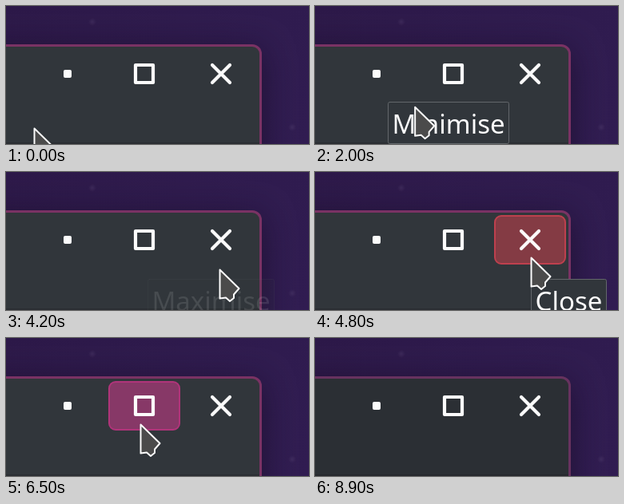
Write an HTML page with a canvas that moves like this. It is 379x173 px and loops after 9000 ms.

```html
<!DOCTYPE html>
<html lang="en">
<head>
<meta charset="utf-8">
<title>Window buttons</title>
<style>
  html, body { margin: 0; width: 100%; height: 100%; overflow: hidden; background: #2d1a4a; }
  canvas { display: block; }
</style>
</head>
<body>
<canvas width="379" height="173"></canvas>
<script>
const ctx = document.querySelector('canvas').getContext('2d');
const W = 379, H = 173, LOOP = 9000;
const FADE = 200, SAMPLES = 20;
const PRESS = 6400, RELEASE = 7450;

// Where the pointer rests; sag bends the way into a stop downwards.
const stops = [
  { x: 35, y: 153, arrive: -LOOP, leave: 320 },
  { x: 87, y: 100, arrive: 900, leave: 1380 },
  { x: 134, y: 127, arrive: 2250, leave: 2700, sag: 8 },
  { x: 178, y: 108, arrive: 3000, leave: 3270 },
  { x: 267, y: 122, arrive: 4200, leave: 4250, sag: 8 },
  { x: 270, y: 107, arrive: 4650, leave: 5260 },
  { x: 168, y: 108, arrive: 6480, leave: 6900, sag: 20 },
  { x: 168, y: 128, arrive: 7290, leave: 7320 },
  { x: 147, y: 118, arrive: 7700, leave: 7820 },
  { x: -32, y: 176, arrive: 8300, leave: LOOP }
];

const tips = [
  { label: 'Minimise', x: 91, y: 120, show: 1300, hide: 2090 },
  { label: 'Maximise', x: 177, y: 134, show: 2800, hide: 3925 },
  { label: 'Close', x: 270, y: 134, show: 4580, hide: 5780 }
];

const pink = { fill: [124, 56, 98], edge: [171, 52, 120] };
const pressed = { fill: [163, 57, 116], edge: [187, 53, 127] };
const red = { fill: [132, 59, 68], edge: [190, 64, 78] };
const tones = [pink, pink, red];

const ramp = (t, start, span) => Math.max(0, Math.min(1, (t - start) / span));
const smooth = p => p * p * (3 - 2 * p);
const lerp = (a, b, p) => a + (b - a) * p;
const mix = (a, b, p) => `rgb(${a.map((v, i) => Math.round(lerp(v, b[i], p)))})`;
const centerX = button => 77 + 96 * button;

function rounded(x, y, w, h, r) {
  ctx.beginPath();
  ctx.roundRect(x, y, w, h, r);
}

function pointerAt(t) {
  const i = stops.findIndex(s => t <= s.leave);
  const next = stops[i];
  if (t >= next.arrive) return next;
  const last = stops[i - 1];
  const p = smooth(ramp(t, last.leave, next.arrive - last.leave));
  return {
    x: lerp(last.x, next.x, p),
    y: lerp(last.y, next.y, p) + (next.sag || 0) * Math.sin(Math.PI * p)
  };
}

function isHot(button, t) {
  if (t > PRESS && t < RELEASE) return button === 1;
  const { x, y } = pointerAt(t);
  return y < 117 && Math.abs(x - centerX(button)) < 45;
}

// The highlight follows the hover state, averaged over the fade time.
function hoverAlpha(button, t) {
  let hot = 0;
  for (let i = 0; i < SAMPLES; i++) hot += isHot(button, t - FADE * i / SAMPLES);
  return hot / SAMPLES;
}

function drawBackdrop() {
  const g = ctx.createLinearGradient(0, 0, W, H);
  g.addColorStop(0, '#2c1848');
  g.addColorStop(1, '#301c51');
  ctx.fillStyle = g;
  ctx.fillRect(0, 0, W, H);
  for (const [x, y] of [[108, 20], [358, 152]]) {
    const glow = ctx.createRadialGradient(x, y, 0, x, y, 5);
    glow.addColorStop(0, 'rgba(105,85,130,.25)');
    glow.addColorStop(1, 'rgba(105,85,130,0)');
    ctx.fillStyle = glow;
    ctx.fillRect(x - 5, y - 5, 10, 10);
  }
}

function drawWindow(idle) {
  ctx.save();
  ctx.shadowColor = 'rgba(18,8,30,.6)';
  ctx.shadowBlur = 38;
  ctx.shadowOffsetY = 8;
  ctx.fillStyle = mix([122, 50, 100], [103, 50, 95], idle);
  rounded(-40, 48, 360, 200, 12);
  ctx.fill();
  ctx.restore();
  ctx.fillStyle = mix([49, 54, 59], [43, 47, 52], idle);
  rounded(-40, 51, 357, 200, 9);
  ctx.fill();
  ctx.fillStyle = mix([43, 46, 51], [38, 41, 46], idle);
  ctx.fillRect(0, 171, 317, 2);
}

function drawHover(button, t) {
  const press = button === 1 ? ramp(t, PRESS, 350) : 0;
  const tone = tones[button];
  ctx.globalAlpha = hoverAlpha(button, t);
  ctx.fillStyle = mix(tone.fill, pressed.fill, press);
  ctx.strokeStyle = mix(tone.edge, pressed.edge, press);
  ctx.lineWidth = 2;
  rounded(centerX(button) - 48 + 4, 55, 88, 60, 8);
  ctx.fill();
  ctx.stroke();
  ctx.globalAlpha = 1;
}

function drawIcons() {
  ctx.fillStyle = ctx.strokeStyle = '#fcfcfc';
  ctx.lineWidth = 4.2;
  ctx.lineJoin = ctx.lineCap = 'round';
  rounded(centerX(0) - 5, 80, 10, 10, 2);
  ctx.fill();
  ctx.strokeRect(centerX(1) - 11, 74, 22, 22);
  ctx.beginPath();
  for (const side of [-11, 11]) {
    ctx.moveTo(centerX(2) - side, 74);
    ctx.lineTo(centerX(2) + side, 96);
  }
  ctx.stroke();
}

function drawTip({ label, x, y, show, hide }, t) {
  ctx.globalAlpha = ramp(t, show, 130) * (1 - ramp(t, hide, 310));
  ctx.font = '33px "Noto Sans", sans-serif';
  const textWidth = ctx.measureText(label).width;
  const w = Math.round(textWidth + 11);
  ctx.fillStyle = '#31363b';
  ctx.strokeStyle = '#63676b';
  ctx.lineWidth = 1;
  rounded(x + 0.5, y + 0.5, w - 1, 52, 2);
  ctx.fill();
  ctx.stroke();
  ctx.fillStyle = '#fcfcfc';
  ctx.fillText(label, x + (w - textWidth) / 2, y + 40);
  ctx.globalAlpha = 1;
}

function drawPointer({ x, y }) {
  ctx.save();
  ctx.translate(x, y);
  ctx.lineWidth = 2;
  ctx.lineJoin = 'round';
  ctx.fillStyle = '#4b4b4b';
  ctx.strokeStyle = '#fcfcfc';
  ctx.shadowColor = 'rgba(0,0,0,.3)';
  ctx.shadowBlur = 3;
  const outline = new Path2D('M.5 .5L24.5 24L18 31.5V36L13 40L8 35.5L.5 36.5Z');
  ctx.fill(outline);
  ctx.shadowColor = 'transparent';
  ctx.stroke(outline);
  ctx.restore();
}

function frame() {
  const t = performance.now() % LOOP;
  drawBackdrop();
  drawWindow(ramp(t, 8700, 200));
  for (let button = 0; button < 3; button++) drawHover(button, t);
  drawIcons();
  for (const tip of tips) drawTip(tip, t);
  drawPointer(pointerAt(t));
  requestAnimationFrame(frame);
}
frame();
</script>
</body>
</html>
```
